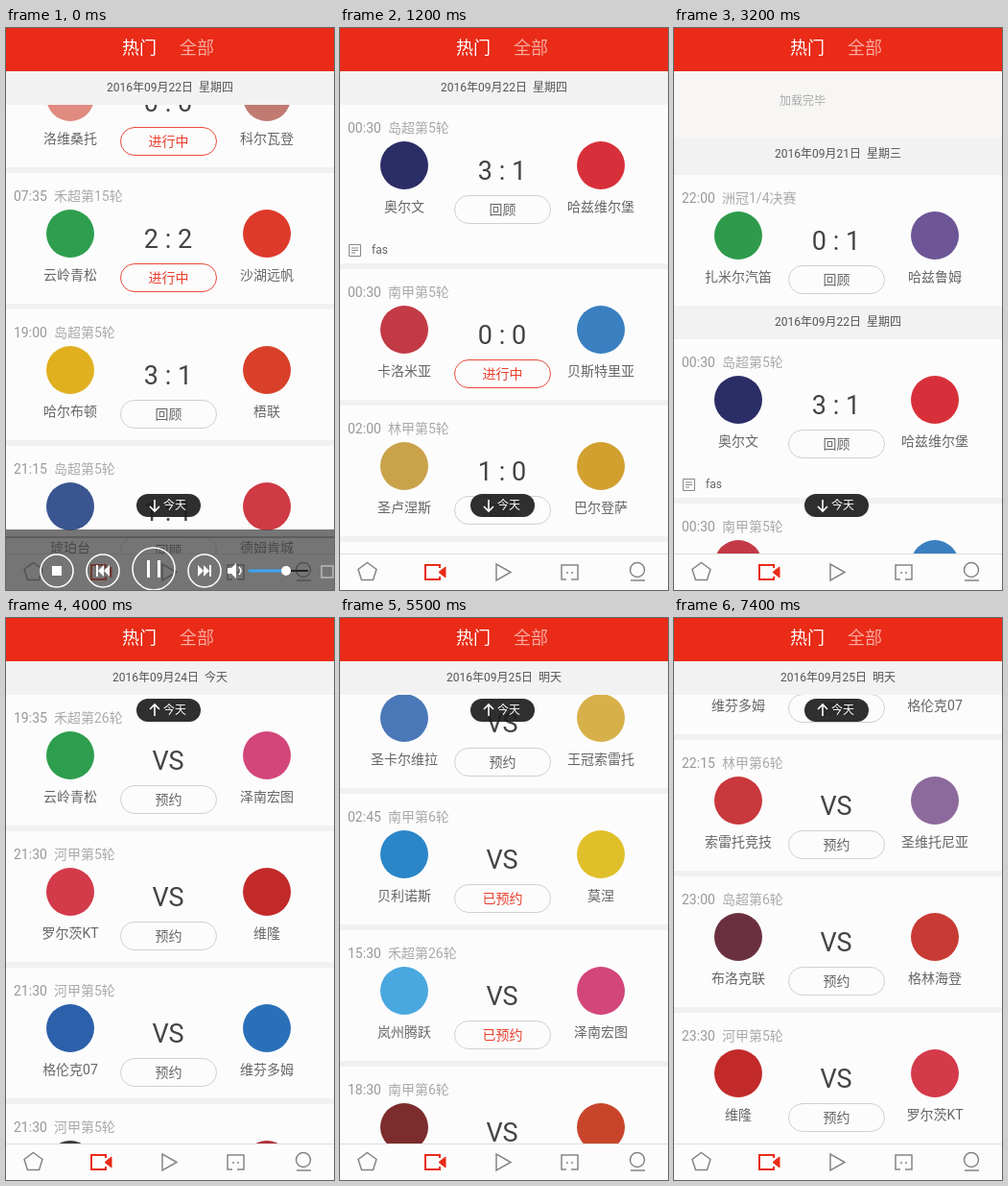
An HTML page that plays this animation: 342x585 px, repeating every 7800 ms.

```html
<!DOCTYPE html>
<html lang="zh-CN">
<head>
<meta charset="utf-8">
<style>
html, body { margin: 0; width: 100%; height: 100%; overflow: hidden; background: #fcfcfc; }
body { position: relative; font: 14px/20px Roboto, "Noto Sans CJK SC", "Noto Sans CJK", sans-serif; color: #666; }
div, span, svg { position: absolute; top: 0; left: 0; white-space: pre; }
#stage { width: 342px; height: 585px; overflow: hidden; background: #fcfcfc; }
#list { width: 342px; background: #f1f1f1; }
.bar { width: 342px; height: 35px; background: #f2f2f2; font-size: 12px; line-height: 35px; text-align: center; color: #555; }
.card { width: 342px; background: #fcfcfc; }
.time { left: 8px; top: 14px; color: #999; }
.league { left: 50px; top: 14px; color: #aaa; }
.crest { top: 38px; width: 50px; height: 50px; border-radius: 50%; }
.name { top: 96px; width: 120px; text-align: center; }
.score { left: 109px; width: 120px; top: 54px; line-height: 30px; font-size: 27px; text-align: center; color: #444; }
.btn { left: 119px; top: 94px; width: 99px; height: 28px; line-height: 28px; border: 1px solid #d0d0d0; border-radius: 15px; text-align: center; color: #666; }
.live { border-color: #ea4a3a; }
.live, .booked { color: #e8402f; }
#pull { width: 342px; height: 110px; background: #f7f6f4; }
#tip { left: 74px; width: 120px; top: 62px; text-align: center; font-size: 12px; color: #aaa; }
#top { width: 342px; height: 45px; background: #e92b17; font-size: 18px; color: #fff; }
#top span { top: 11px; }
#pill { left: 136px; width: 67px; height: 24px; border-radius: 12px; background: rgba(30,30,30,.92); color: #fff; font-size: 12px; }
#pill span { left: 28px; top: 2px; }
#tabs { top: 547px; }
</style>
</head>
<body>
<div id="stage">
  <div id="list"></div>
  <div id="pull">
    <svg id="toy" width="342" height="110">
      <defs><pattern id="net" width="5" height="5" patternUnits="userSpaceOnUse" patternTransform="rotate(25)">
        <rect width="5" height="5" fill="#e2e2e2"/><path d="M0 0H5M0 0V5" stroke="#c6c6c6"/>
      </pattern></defs>
      <path d="M200 106L203 80L257 51L283 53L313 106Z" fill="url(#net)" stroke="#777"/>
      <g fill="none" stroke-width="4">
        <path d="M203 80L257 51L266 105" stroke="#fff"/>
        <path d="M203 80L257 51L266 105" stroke="#dc3a3a" stroke-dasharray="6 5"/>
      </g>
      <path d="M32 94L31 104M42 94L44 104" stroke="#333" stroke-width="5"/>
      <path d="M28 105H34M41 105H48" stroke="#222" stroke-width="3"/>
      <rect x="30" y="79" width="15" height="17" rx="3" fill="#d93a34" stroke="#333"/>
      <path d="M35 84H40M35 88H40M35 92H40M35 84V92" stroke="#333" stroke-width="1.5"/>
      <circle cx="37" cy="71" r="8.500" fill="#f3c9a5" stroke="#333"/>
      <path d="M28 72Q26 59 38 60Q48 61 46 68L36 66L33 73Z" fill="#6b3526"/>
      <path d="M42 70V73" stroke="#333" stroke-width="1.5"/>
      <g id="ball"><circle r="6" fill="#fff" stroke="#333"/><path d="M0 -2.500L2.500 -.5L1.500 2H-1.500L-2.500 -.5ZM-4.500 -3L-3 -4.500M4.500 -3L3 -4.500M-4 3.500L-3 4.500M4 3.500L3 4.500" fill="#222" stroke="#222"/></g>
    </svg>
    <span id="tip"></span>
  </div>
  <div id="sticky" class="bar"></div>
  <div id="top"><span style="left:121px">热门</span><span style="left:181px;color:#f9aaa1">全部</span></div>
  <div id="pill"><svg width="67" height="24" fill="none" stroke="#fff" stroke-width="1.6"><path id="arrow"/></svg><span>今天</span></div>
  <svg id="tabs" width="342" height="38" fill="none" stroke="#858585" stroke-width="1.5">
    <path d="M0 0H342V38H0Z" fill="#fcfcfc" stroke="none"/><path d="M0 .5H342" stroke="#dedede" stroke-width="1"/>
    <path d="M28.500 9.500L38 16.500L34.500 27.500H22.500L19 16.500Z"/>
    <g stroke="#e92b17" stroke-width="2"><path d="M104 15V12H89V27H104V24"/><path d="M103 19.500L110 14V25Z" fill="#e92b17" stroke-width="1"/></g>
    <path d="M163 11V28L178 19.500Z"/>
    <path d="M236 27H231V12H248V27H241M236 20H238M241 20H243"/>
    <circle cx="310" cy="17" r="7.500"/><path d="M303 28H318"/>
  </svg>
  <svg id="player" width="342" height="64" fill="none" stroke="#fff" stroke-width="1.5">
    <path d="M0 0H342V64H0Z" fill="#3c3c3c" fill-opacity=".7" stroke="none"/>
    <path d="M0 8H342" stroke="#555"/>
    <g id="seek"><path id="done" stroke="#3ba4f5" stroke-width="2"/><circle id="knob" cy="8" r="4.500" fill="#fff" stroke="none"/></g>
    <circle cx="53" cy="43" r="17"/><circle cx="101" cy="43" r="17"/><circle cx="154" cy="41" r="22"/><circle cx="207" cy="43" r="17"/>
    <g fill="#fff" stroke="none">
      <path d="M48 38H58V48H48ZM94 37H96V49H94ZM102 37V49L96 43ZM108 37V49L102 43ZM147 32H150V50H147ZM158 32H161V50H158Z"/>
      <path d="M200 37V49L206 43ZM206 37V49L212 43ZM212 37H214V49H212ZM231 40H235L240 35V51L235 46H231Z"/>
    </g>
    <path d="M243 39Q247 43 243 47"/>
    <path d="M253 43H292" stroke="#3ba4f5" stroke-width="3"/><path d="M292 43H315" stroke="#222" stroke-width="2"/><circle cx="292" cy="43" r="5" fill="#fff" stroke="none"/>
    <path d="M329 38H341V50H329Z" stroke="#bbb"/>
  </svg>
</div>
<script>
// time|league|home|away|score|button|home colour|away colour
const days = [
  ['2016年09月21日  星期三', `22:00|洲冠1/4决赛|扎米尔汽笛|哈兹鲁姆|0 : 1|回顾|2f9a4c|6d5596`],
  ['2016年09月22日  星期四', `00:30|岛超第5轮|奥尔文|哈兹维尔堡|3 : 1|回顾|2b2d66|d8303a
00:30|南甲第5轮|卡洛米亚|贝斯特里亚|0 : 0|进行中|c23a45|3a7fc0
02:00|林甲第5轮|圣卢涅斯|巴尔登萨|1 : 0|回顾|c9a24a|d2a02f
02:45|南甲第5轮|佩利亚|托维纳|0 : 0|进行中|d9d9d9|d9d9d9
02:45|南甲第5轮|莫涅|卡维诺|0 : 0|进行中|dedede|dedede
02:45|南甲第5轮|奥雷西亚|佩托拉|0 : 0|进行中|2468a8|dedede
02:45|南甲第5轮|罗维萨|联合维桑|0 : 0|进行中|2a5fa8|2f3a5c
02:45|南甲第5轮|塔维纳|贝利诺斯|0 : 0|进行中|c32f35|2a86c8
02:45|南甲第5轮|马里奥纳|卢纳|0 : 0|进行中|8a3030|c8452c
04:00|林甲第5轮|索雷托竞技|圣维托尼亚|0 : 0|进行中|c8383c|8c6a9c
04:00|林甲第5轮|王冠索雷托|巴尔登萨|0 : 0|进行中|d8b04a|d2a02f
04:00|林甲第5轮|洛维桑托|科尔瓦登|0 : 0|进行中|e08a80|c07a72
07:35|禾超第15轮|云岭青松|沙湖远帆|2 : 2|进行中|2e9e4e|dd3a2c
19:00|岛超第5轮|哈尔布顿|梧联|3 : 1|回顾|e0b020|d8402a
21:15|岛超第5轮|琥珀台|德姆肯城|1 : 1|回顾|3a5590|cf3a44
23:00|岛超第5轮|布洛克联|格林海登|2 : 1|回顾|6b3040|c83a34`],
  ['2016年09月24日  今天', `19:35|禾超第26轮|云岭青松|泽南宏图||预约|2e9e4e|d2467a
21:30|河甲第5轮|罗尔茨KT|维隆||预约|d33a4a|c22a2a
21:30|河甲第5轮|格伦克07|维芬多姆||预约|2c60aa|2a70b8
21:30|河甲第5轮|布辛卡尔...|罗登费尔特||预约|3a3a3a|b03038
21:30|河甲第5轮|莱因茨堡|维森哈特尔||预约|b53a38|26479a
21:30|河甲第5轮|罗堡|诺登维利希||预约|1f4a8a|d0303c
21:30|河甲第5轮|凯尔多夫|维登星光||预约|dedede|2a4f9c
22:00|岛超第6轮|奥尔文|琥珀台||预约|2b2d66|3a5590
23:00|岛超第6轮|哈尔布顿|德姆肯城||预约|e0b020|cf3a44`],
  ['2016年09月25日  明天', `00:30|岛超第6轮|梧联|哈兹维尔堡||预约|d8402a|d8303a
02:45|林甲第6轮|圣卡尔维拉|王冠索雷托||预约|4a78b8|d8b04a
02:45|南甲第6轮|贝利诺斯|莫涅||已预约|2a86c8|e0c02a
15:30|禾超第26轮|岚州腾跃|泽南宏图||已预约|4aa8e0|d2467a
18:30|南甲第6轮|马里奥纳|卢纳||预约|7c2c2c|c8452c
19:00|南甲第6轮|罗维萨|卡维诺||预约|2a5fa8|3a9a5a
20:30|南甲第6轮|奥雷西亚|佩托拉||预约|2468a8|e08aa8
21:00|南甲第6轮|塔维纳|联合维桑||预约|c32f35|2f3a5c
21:30|河甲第5轮|维芬多姆|格伦克07||预约|2a70b8|2c60aa
22:15|林甲第6轮|索雷托竞技|圣维托尼亚||预约|c8383c|8c6a9c
23:00|岛超第6轮|布洛克联|格林海登||预约|6b3040|c83a34
23:30|河甲第5轮|维隆|罗尔茨KT||预约|c22a2a|d33a4a`]
];

// time, row, y of that row's kick-off label, easing into it
const path = [
  [0, 12, 33], [600, 5, 44, 'line'], [1100, 1, 104, 'out'], [1200, 1, 104, 'line'],
  [1900, 1, 213, 'out'], [2800, 1, 213, 'line'], [2900, 0, 217, 'cut'], [3000, 0, 217, 'line'],
  [3200, 0, 177, 'line'], [3400, 0, 108, 'line'], [3900, 3, 110, 'out'], [4000, 17, 104, 'cut'],
  [4700, 20, 42, 'line'], [5500, 27, 65, 'line'], [6400, 33, 110, 'line'],
  [6900, 34, 60, 'out'], [7100, 34, 60, 'line'], [7400, 34, 9, 'out']
];
const ease = { line: p => p, out: p => 1 - (1 - p) ** 2, cut: p => p < 1 ? 0 : 1 };
const LOOP = 7800, STEP = 100, HEAD = 45, BAR = 35;
const $ = id => document.getElementById(id);
const rowY = [], sections = [];

function add(parent, cls, text = '', style = '') {
  const el = document.createElement('div');
  el.className = cls;
  el.textContent = text;
  el.style.cssText = style;
  parent.append(el);
  return el;
}

function addCard(data, y) {
  const [time, league, home, away, score, btn, c1, c2] = data.split('|');
  const hasNote = rowY.length === 1;
  const height = hasNote ? 165 : 136;
  const card = add($('list'), 'card', '', `top:${y}px;height:${height}px`);
  add(card, 'time', time);
  add(card, 'league', league);
  [[home, c1, 67], [away, c2, 272]].forEach(([name, color, x]) => {
    add(card, 'crest', '', `left:${x - 25}px;background:#${color}`);
    add(card, 'name', name, `left:${x - 60}px`);
  });
  add(card, 'score', score || 'VS');
  add(card, 'btn' + ({ 进行中: ' live', 已预约: ' booked' }[btn] || ''), btn);
  if (hasNote) {
    card.insertAdjacentHTML('beforeend', '<svg style="left:8px;top:144px" width="15" height="15" fill="none" stroke="#888"><path d="M1.500 1.500H13.500V13.500H1.500ZM4 5H11M4 7.500H11M4 10H8"/></svg>');
    add(card, '', 'fas', 'left:33px;top:141px;font-size:12px');
  }
  rowY.push(y + 24);
  return y + height;
}

let end = 0;
days.forEach(([date, rows], d) => {
  const height = d ? BAR : BAR + 4;
  sections.push({ y: end, date });
  add($('list'), 'bar', date, `top:${end}px;height:${height}px`);
  end += height;
  rows.split('\n').forEach((row, i) => { end = addCard(row, end + (i ? 6 : 0)); });
});
$('list').style.height = end + 'px';

function listTop(t) {
  const at = k => k[2] - rowY[k[1]];
  const i = path.findIndex(k => k[0] > t);
  if (i < 0) return at(path[path.length - 1]);
  const a = path[i - 1], b = path[i];
  return at(a) + (at(b) - at(a)) * ease[b[3]]((t - a[0]) / (b[0] - a[0]));
}

const moveY = (id, y) => { $(id).style.transform = `translateY(${Math.round(y)}px)`; };
const show = (id, on) => { $(id).style.visibility = on ? 'visible' : 'hidden'; };

function draw(time) {
  const t = Math.floor(time % LOOP / STEP) * STEP;
  const top = listTop(t);
  moveY('list', top);

  const first = t < 2900 ? 1 : 0;
  const head = top + sections[first].y;
  moveY('pull', head - 110);
  show('pull', head > HEAD);
  show('toy', head > HEAD && t < 2900);
  $('tip').textContent = t < 1700 ? '下拉刷新' : t < 2300 ? '释放刷新' : t < 2900 ? '加载中' : '加载完毕';
  const kick = Math.min(1, Math.max(0, (t - 2200) / 500));
  $('ball').setAttribute('transform', `translate(${56 + 185 * kick} ${97 - 40 * kick * (1 - kick)}) rotate(${kick * 540})`);

  const now = sections.filter((s, i) => i >= first && s.y + top <= HEAD).pop();
  show('sticky', now);
  if (now) {
    const next = sections[sections.indexOf(now) + 1];
    $('sticky').textContent = now.date;
    moveY('sticky', Math.min(HEAD, next ? next.y + top - BAR : HEAD));
  }

  const past = t >= 4000;
  moveY('pill', past ? 84 : 485);
  $('arrow').setAttribute('d', past ? 'M19 18V6M14 11L19 6L24 11' : 'M19 6V18M14 13L19 18L24 13');

  moveY('player', 522 + 25 * (Math.max(0, t - 300) / 300) ** 2);
  show('player', t < 900);
  $('seek').style.display = t ? '' : 'none';
  const x = 4 + t * 0.037;
  $('done').setAttribute('d', `M0 8H${x}`);
  $('knob').setAttribute('cx', x);
}

const start = performance.now();
function tick() {
  draw(performance.now() - start);
  requestAnimationFrame(tick);
}
tick();
</script>
</body>
</html>
```
